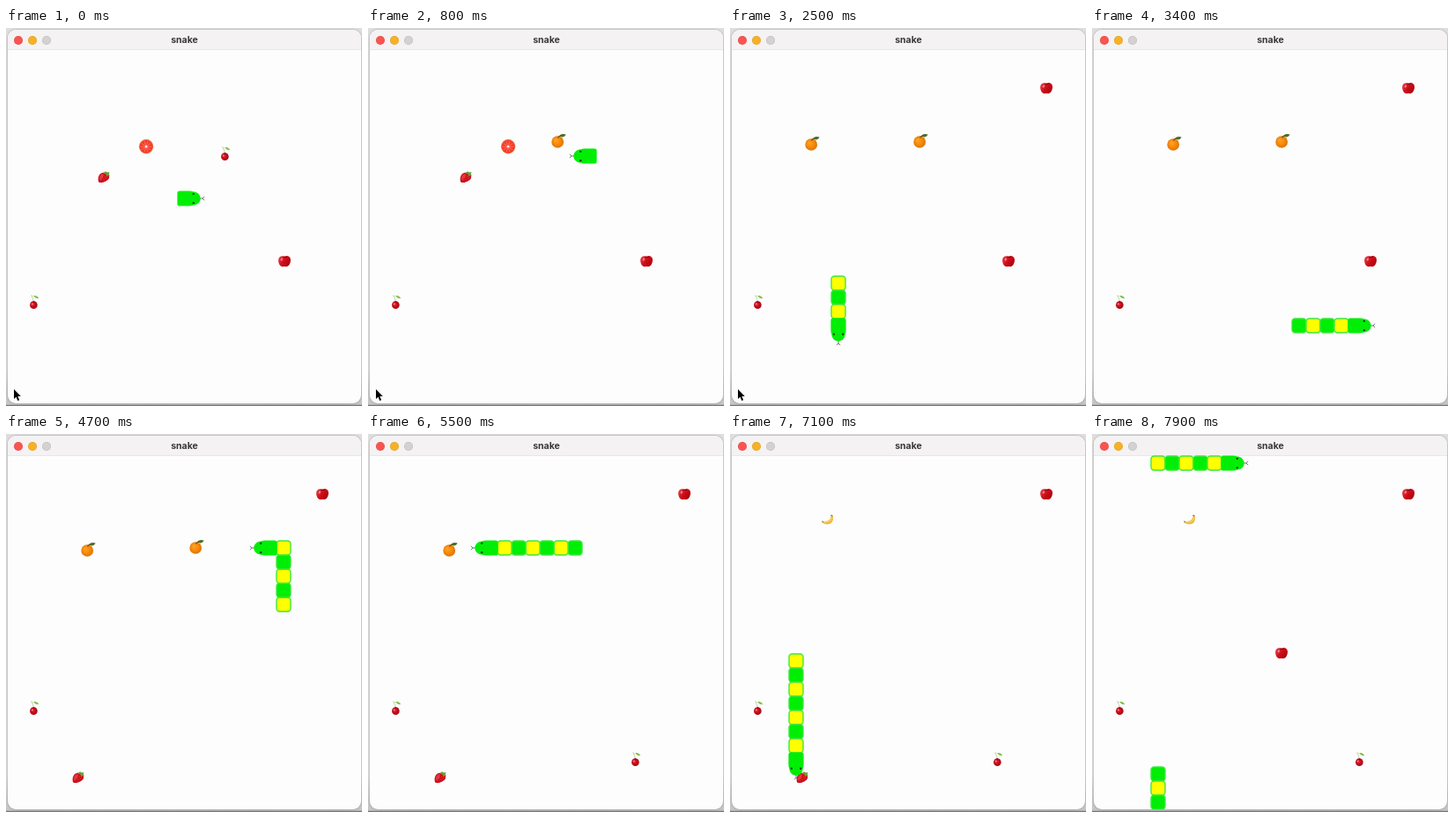
Recreate the animation shown at these times as an HTML page with a canvas. Size 404 px wide and 428 px high, loop 8000 ms.

```html
<!DOCTYPE html>
<html lang="en">
<head>
<meta charset="utf-8">
<title>snake</title>
<style>
  html, body { margin: 0; width: 404px; height: 428px; overflow: hidden; }
  body { position: relative; background: linear-gradient(#dedede 0 90%, #c4c4c4 99.6%, #777 99.8%); }
  #window {
    position: absolute; left: 2px; top: 2px; width: 401px; height: 423px;
    border-radius: 9px; overflow: hidden; background: #fdfdfd;
    box-shadow: 0 0 2px rgba(0, 0, 0, .4);
  }
  #bar {
    height: 23px; box-sizing: border-box; background: #f4f2f3; border-bottom: 1px solid #e9e7e8;
    font: 700 10.5px/23px Inter, Roboto, sans-serif; color: #383838; text-align: center;
  }
  #bar i {
    position: absolute; top: 6.5px; width: 10px; height: 10px; border-radius: 50%;
    box-shadow: inset 0 0 0 .5px rgba(0, 0, 0, .12);
  }
  canvas { position: absolute; left: 0; top: 0; }
</style>
</head>
<body>
<div id="window">
  <div id="bar">
    <i style="left:6.5px;background:#fc5350"></i>
    <i style="left:22.5px;background:#f8b123"></i>
    <i style="left:38.5px;background:#d3d1d2"></i>
    snake
  </div>
</div>
<canvas id="stage" width="404" height="428"></canvas>
<script>
const ctx = document.getElementById('stage').getContext('2d');
const LOOP = 8000, FRAME = 100, STEP = 84, PHASE = 0.79;
const CELL = 16, LEFT = 3, TOP = 25, GRID = 25;
const POINTER_GONE = 3000;

// Each run: direction x, direction y, number of cells
const runs = [
  [1, 0, 5], [0, -1, 3], [-1, 0, 10], [0, 1, 12], [1, 0, 12],
  [0, -1, 13], [-1, 0, 15], [0, 1, 19], [1, 0, 6]
];
const path = [{ x: 12, y: 10, dx: 1, dy: 0 }];
for (const [dx, dy, count] of runs) {
  for (let i = 0; i < count; i++) {
    const p = path[path.length - 1];
    path.push({ x: (p.x + dx + GRID) % GRID, y: (p.y + dy + GRID) % GRID, dx, dy });
  }
}

function ellipse(x, y, rx, ry, color, turn = 0) {
  ctx.fillStyle = color;
  ctx.beginPath();
  ctx.ellipse(x, y, rx, ry, turn, 0, Math.PI * 2);
  ctx.fill();
}

function line(d, color, width) {
  ctx.strokeStyle = color;
  ctx.lineWidth = width;
  ctx.stroke(new Path2D(d));
}

function shape(d, color) {
  ctx.fillStyle = color;
  ctx.fill(new Path2D(d));
}

function ball(x, y, rx, ry, light, mid, dark) {
  const g = ctx.createRadialGradient(x - rx * .35, y - ry * .35, 0, x, y, rx * 1.1);
  g.addColorStop(0, light);
  g.addColorStop(.5, mid);
  g.addColorStop(1, dark);
  ellipse(x, y, rx, ry, g);
}

const draw = {
  apple() {
    const g = ctx.createLinearGradient(-6, -4, 6, 5);
    g.addColorStop(0, '#e23a44');
    g.addColorStop(.5, '#cc0a16');
    g.addColorStop(1, '#a4040e');
    shape('M0-5.4C3-7 7-5.5 7-1.5C7 3 4.5 6.4 2 6.2Q0 5.8-2 6.2C-5 6.4-6.9 2.5-6.9-1C-6.9-5-3.5-6.8 0-5.4Z', g);
    line('M-1.5-4.6Q1-3.8 3-5', '#86060e', 1.2);
    ellipse(-3.2, -2, 1, 1.6, '#f4888c', .4);
  },
  orange() {
    ball(-.8, 1, 6.9, 6.7, '#ffa628', '#f88c0c', '#d87004');
    shape('M.8-5C2-8 5-8.4 8.6-7.4C7.4-4.6 4.5-4 2.4-5Z', '#4c6c28');
    line('M-.5-3.5Q0-5 2-5.8', '#6a4a1c', 1.2);
  },
  cherry() {
    line('M-.5 1Q-1-4-3.3-7.5', '#b9c8a0', .9);
    line('M-3.3-7L0-6', '#c9d4b4', .6);
    shape('M-.5-6.8C1.5-7.6 4-6.4 5.2-4C3-3.4.5-4.2-.5-6.8Z', '#84c24c');
    ball(-.6, 3.7, 4.3, 4.4, '#e8404a', '#cc0c1a', '#980814');
    line('M-.6-.8V1.4', '#7b1414', .9);
    ellipse(-2.2, 2.6, .7, 1, '#f79a9c');
  },
  strawberry() {
    shape('M-5.8 5.6C-7.6 1-5.5-4.5-1-5.2C3.5-5.8 6.8-2.5 6 .8C5 4-1.5 7.4-5.8 5.6Z', '#cc101c');
    shape('M-5 3C-5.6-1-3.4-4.2-.4-4C.6-2-2 3-5 3Z', '#e6343e');
    shape('M-.5-4.8L2-6.8L4-5.4L6.4-6L5.8-3.6L7-1.5L4.6-2L3.4-.6L2.6-3.2Z', '#6a9c38');
    for (let i = 0; i < 5; i++) ellipse(-3 + i * 1.5, 3 - (i * 3) % 5, .4, .4, '#f0905c');
  },
  grapefruit() {
    ellipse(.1, .3, 8.2, 8.2, '#e8743c');
    ellipse(.1, .3, 7.2, 7.2, '#f63a2e');
    for (let i = 0; i < 5; i++) {
      const a = i * Math.PI / 5, x = 6.3 * Math.cos(a), y = 6.3 * Math.sin(a);
      line(`M${-x} ${.3 - y}L${x} ${.3 + y}`, '#ff8670', .7);
    }
    ellipse(.1, .3, 1.3, 1.3, '#ffe8dc');
  },
  banana() {
    shape('M3.6-5L5.6-4.6C7.4 1 4 5.4-.8 5.2C-4 5.2-6.4 4-6.4 1.8C-2.5 2.2 4 2 3.6-5Z', '#eeb840');
    line('M-5 2.8Q3.6 3.6 5-2.4', '#fbd878', 1);
    line('M3.4-5L5.4-4.4M-6.2 1.6L-5.6 3.2', '#6e4a20', 1);
  }
};

// kind, x, y, step of appearing, step of being eaten
const fruits = [
  ['strawberry', 111, 169, 0, 19],
  ['grapefruit', 159, 134, 0, 15],
  ['cherry', 249, 142, 0, 10],
  ['apple', 316, 264, 0, 46],
  ['cherry', 32, 310, 0, 999],
  ['orange', 216, 128, 10, 61],
  ['orange', 93, 131, 15, 68],
  ['apple', 134, 344, 19, 30],
  ['apple', 359, 68, 30, 999],
  ['strawberry', 82, 389, 46, 86],
  ['cherry', 304, 368, 61, 999],
  ['banana', 111, 97, 68, 999],
  ['apple', 215, 248, 86, 999]
];

function at(x, y, turn, fn) {
  ctx.save();
  ctx.translate(x, y);
  ctx.rotate(turn);
  fn();
  ctx.restore();
}

function block(color) {
  ctx.beginPath();
  ctx.roundRect(-8, -8, 16, 16, 3.5);
  ctx.fillStyle = color;
  ctx.fill();
  ctx.strokeStyle = '#3ce83c';
  ctx.lineWidth = 1.4;
  ctx.stroke();
}

function head() {
  line('M16.5 0H19.8M22.2-2L19.8 0L22.2 2', '#666', .9);
  shape('M-6-8.6H5Q8-8.6 9-7.8C14.5-7.6 17.7-4 17.7 0S14.5 7.6 9 7.8Q8 8.6 5 8.6H-6Q-8.6 8.6-8.6 6V-6Q-8.6-8.6-6-8.6Z', '#00ee06');
  for (const side of [-1, 1]) {
    ellipse(9.8, side * 5.2, 1.3, 1.1, '#143c12');
    ellipse(15, side * 1.8, .4, .4, '#0a9a10');
  }
}

function render(time) {
  const n = Math.floor(time / STEP + PHASE);
  const length = 1 + fruits.filter(f => f[4] < n).length;
  ctx.clearRect(0, 0, 404, 428);
  ctx.save();
  ctx.beginPath();
  ctx.rect(2, 24, 401, 401);
  ctx.clip();
  for (const [kind, x, y, born, eaten] of fruits) {
    if (n >= born && n < eaten) at(x, y, 0, draw[kind]);
  }
  for (let i = length - 1; i >= 0; i--) {
    const p = path[n - i];
    const x = LEFT + (p.x + .5) * CELL, y = TOP + (p.y + .5) * CELL;
    if (i) at(x, y, 0, () => block(i % 2 ? '#ffff00' : '#00ee06'));
    else at(x, y, Math.atan2(p.dy, p.dx), head);
  }
  ctx.restore();
  if (time < POINTER_GONE) {
    const pointer = 'M9 409V420L11.5 417.7L13.3 422L15.2 421.2L13.4 417H16.8Z';
    line(pointer, '#fff', 1.5);
    shape(pointer, '#000');
  }
}

const start = performance.now();
function tick() {
  const t = (performance.now() - start) % LOOP;
  render(Math.floor(t / FRAME) * FRAME);
  requestAnimationFrame(tick);
}
tick();
</script>
</body>
</html>
```
